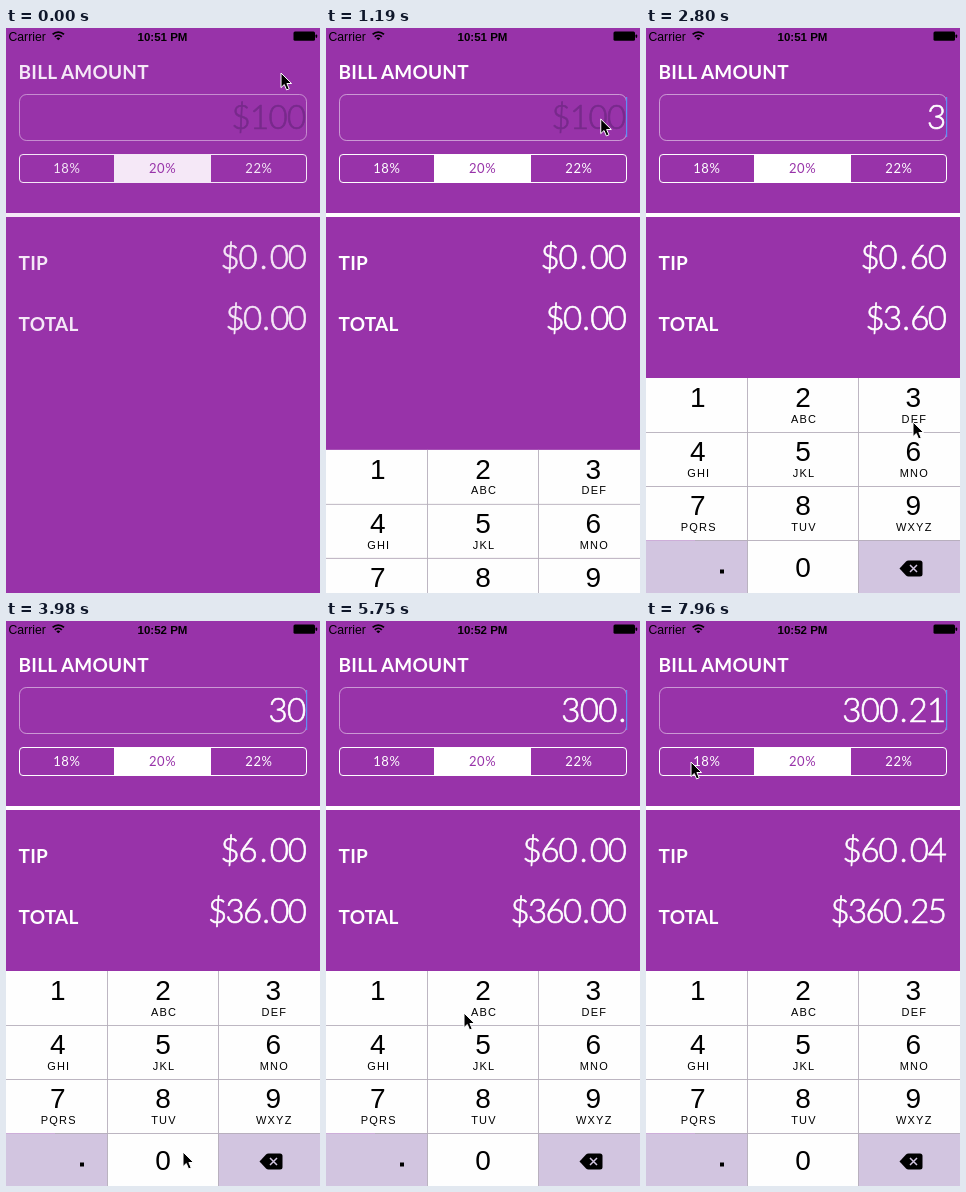
These frames come from a looping animation (314 px wide and 565 px high, 8000 ms). An HTML page:

```html
<!DOCTYPE html>
<html lang="en">
<head>
<meta charset="utf-8">
<title>Tip calculator</title>
<style>
  html, body { margin: 0; width: 100%; height: 100%; overflow: hidden; background: #9833a9; }
  svg { display: block; width: 100vw; height: 100vh; }
  text { font-kerning: none; white-space: pre; }
  .label { font: 700 19px Lato, sans-serif; letter-spacing: .2px; fill: currentColor; }
  .money { font: 300 33px Lato, sans-serif; text-anchor: end; fill: currentColor; stroke: currentColor; stroke-width: .7px; }
  .seg { font: 400 13px Lato, sans-serif; letter-spacing: .6px; text-anchor: middle; fill: currentColor; }
  .status { font: 12.2px "Liberation Sans", Arial, sans-serif; }
  .clock { font: 700 11.5px "Liberation Sans", Arial, sans-serif; text-anchor: middle; }
  .digit { font: 28px "Liberation Sans", Arial, sans-serif; text-anchor: middle; }
  .letters { font: 11px "Liberation Sans", Arial, sans-serif; letter-spacing: 1.2px; text-anchor: middle; }
</style>
</head>
<body>
<svg viewBox="0 0 314 565" preserveAspectRatio="none">
  <rect width="314" height="565" fill="#9833a9"/>

  <text class="status" x="2.5" y="12.5">Carrier</text>
  <g fill="none" stroke="#000" stroke-width="1.8">
    <path d="M46.6 6.4A8.2 8.2 0 0 1 58 6.4M48.8 8.8A5 5 0 0 1 55.8 8.8"/>
    <path d="M52.3 12.3L50.3 10.4A2.9 2.9 0 0 1 54.3 10.4Z" fill="#000" stroke="none"/>
  </g>
  <text class="clock" id="clock" x="156.5" y="12.5"></text>
  <rect x="287.5" y="3.5" width="21.5" height="9.3" rx="1.5"/>
  <rect x="309.5" y="6.4" width="1.7" height="3.5" rx=".8"/>

  <g id="form">
    <text class="label" x="12.6" y="51">BILL AMOUNT</text>
    <rect x="13.5" y="66.5" width="287" height="46" rx="7" fill="none" stroke="currentColor" stroke-opacity=".5"/>
    <text class="money" id="bill" x="299.6" y="100.7" letter-spacing="-.64"></text>

    <rect x="13.5" y="126.5" width="287" height="28" rx="3.5" fill="none" stroke="currentColor"/>
    <rect x="108" y="126" width="97" height="29" fill="currentColor"/>
    <text class="seg" x="60.8" y="145">18%</text>
    <text class="seg" x="156.6" y="145" style="fill:#9833a9">20%</text>
    <text class="seg" x="253" y="145">22%</text>

    <rect y="185" width="314" height="4" fill="currentColor"/>
    <text class="label" x="12.6" y="241.7">TIP</text>
    <text class="money" id="tip" x="299.8" y="241" letter-spacing="-1.14"></text>
    <text class="label" x="12.6" y="302.5">TOTAL</text>
    <text class="money" id="total" x="299.3" y="301.5" letter-spacing="-1.64"></text>
  </g>
  <rect id="caret" x="300" y="69" width="1.2" height="40" fill="#5f8ff5"/>

  <g id="keyboard"></g>

  <path id="cursor" d="M0 0V14.6L3.3 11.5L5.6 16.9L8.2 15.8L5.9 10.5H10.6Z"
    fill="#000" stroke="#fff" stroke-width="1" stroke-linejoin="round"/>
</svg>
<script>
const LOOP = 8000, STEP = 147.3;
const GREY = '#d2c5e0', WHITE = '#fefefe';
const FOCUS = 7, BLINK = 5.5, BLINK_ON = 4;
const $ = id => document.getElementById(id);

const presses = [
  { at: 17, key: '3' }, { at: 26, key: '0' }, { at: 28, key: '0' },
  { at: 36, key: '.' }, { at: 42, key: '2' }, { at: 45, key: '1' }
];

// step, x, y of the pointer tip
const path = [
  [3, 275, 45], [7, 274, 82], [11, 277, 118], [13, 275, 320], [15, 270, 512],
  [16, 267, 430], [17, 267, 394], [20, 267, 394], [21, 258, 420], [22, 212, 490],
  [23, 177, 531], [30, 177, 531], [32, 128, 542], [34, 72, 552], [36, 72, 552],
  [38, 105, 414], [39, 138, 392], [40, 150, 388], [43, 150, 388], [44, 92, 393],
  [45, 65, 391], [48, 65, 391], [49, 63, 376], [51, 45, 240], [52, 34, 180],
  [53, 32, 150], [54, 45, 141]
];

const cols = [0, 101.5, 212.5, 320];
const rows = [0, 54.3, 108.5, 162.5, 215];
const centers = [51.8, 157, 267.3];
const letters = ['', 'ABC', 'DEF', 'GHI', 'JKL', 'MNO', 'PQRS', 'TUV', 'WXYZ'];

function buildKeyboard() {
  let out = '';
  [...'123456789.0<'].forEach((key, i) => {
    const c = i % 3, r = Math.floor(i / 3), x = centers[c];
    out += `<rect data-key="${key}" x="${cols[c]}" y="${rows[r]}" width="${cols[c + 1] - cols[c]}" height="${rows[r + 1] - rows[r]}"/>`;
    if (key === '.') out += '<rect x="74" y="191.500" width="4" height="4"/>';
    else if (key === '<') out +=
      '<path d="M253.5 190.5L260 183.5Q261 182.5 262.5 182.5H274Q276.5 182.5 276.5 185V196Q276.5 198.5 274 198.5H262.5Q261 198.5 260 197.5Z"/>' +
      `<path d="M264 187L271 194M271 187L264 194" stroke="${GREY}" stroke-width="1.5"/>`;
    else out += `<text class="digit" x="${x}" y="${[29, 83, 137, 199][r]}">${key}</text>`;
    if (letters[i]) out += `<text class="letters" x="${x + 1}" y="${rows[r] + 44.5}">${letters[i]}</text>`;
  });
  out += '<path d="M0 54.5H314M0 108.5H314M49 162.5H314M101.5 0V215M212.5 0V215" stroke="#b3b0b8" stroke-width=".8"/>';
  $('keyboard').innerHTML = out;
}

function pointerAt(n) {
  if (n <= path[0][0]) return path[0].slice(1);
  const i = path.findIndex(p => p[0] >= n);
  if (i < 0) return path[path.length - 1].slice(1);
  const [n0, x0, y0] = path[i - 1], [n1, x1, y1] = path[i];
  const k = (n - n0) / (n1 - n0);
  return [x0 + (x1 - x0) * k, y0 + (y1 - y0) * k];
}

// Gives the decimal point some air on both sides.
function setMoney(id, value, gap) {
  const [whole, cents] = value.split('.');
  $(id).innerHTML = cents === undefined ? whole
    : `${whole}<tspan dx="${gap}">.</tspan>` + (cents && `<tspan dx="${gap}">${cents}</tspan>`);
}

function render(t) {
  const n = Math.floor(t / STEP);
  const typed = presses.filter(p => p.at <= n);
  const bill = typed.map(p => p.key).join('');
  const amount = Number(bill) || 0;

  $('form').style.color = n < 1 ? '#f5e8f7' : '#fff';
  $('clock').textContent = n < 26 ? '10:51 PM' : '10:52 PM';
  $('bill').style.fill = $('bill').style.stroke = bill ? '' : '#782a8c';
  setMoney('bill', bill || '$100', 1.85);
  setMoney('tip', '$' + (amount * .2).toFixed(2), 3.35);
  setMoney('total', '$' + (amount * 1.2).toFixed(2), 1.85);

  const since = n - (typed.length ? typed[typed.length - 1].at : FOCUS);
  $('caret').setAttribute('opacity', since >= 0 && since % BLINK < BLINK_ON ? 1 : 0);

  const rise = Math.min(1, Math.max(0, (n - FOCUS) / 3));
  const top = n < FOCUS ? 565 : 350 + 198 * (1 - rise) ** 2.5;
  $('keyboard').setAttribute('transform', `translate(0 ${top})`);
  const down = presses.find(p => p.at === n);
  document.querySelectorAll('[data-key]').forEach(el => {
    const key = el.dataset.key;
    const grey = '.<'.includes(key) !== Boolean(down && down.key === key);
    el.setAttribute('fill', grey ? GREY : WHITE);
  });

  $('cursor').setAttribute('transform', `translate(${pointerAt(n).join(' ')})`);
}

buildKeyboard();
const start = performance.now();
function tick() {
  render((performance.now() - start) % LOOP);
  requestAnimationFrame(tick);
}
tick();
</script>
</body>
</html>
```
